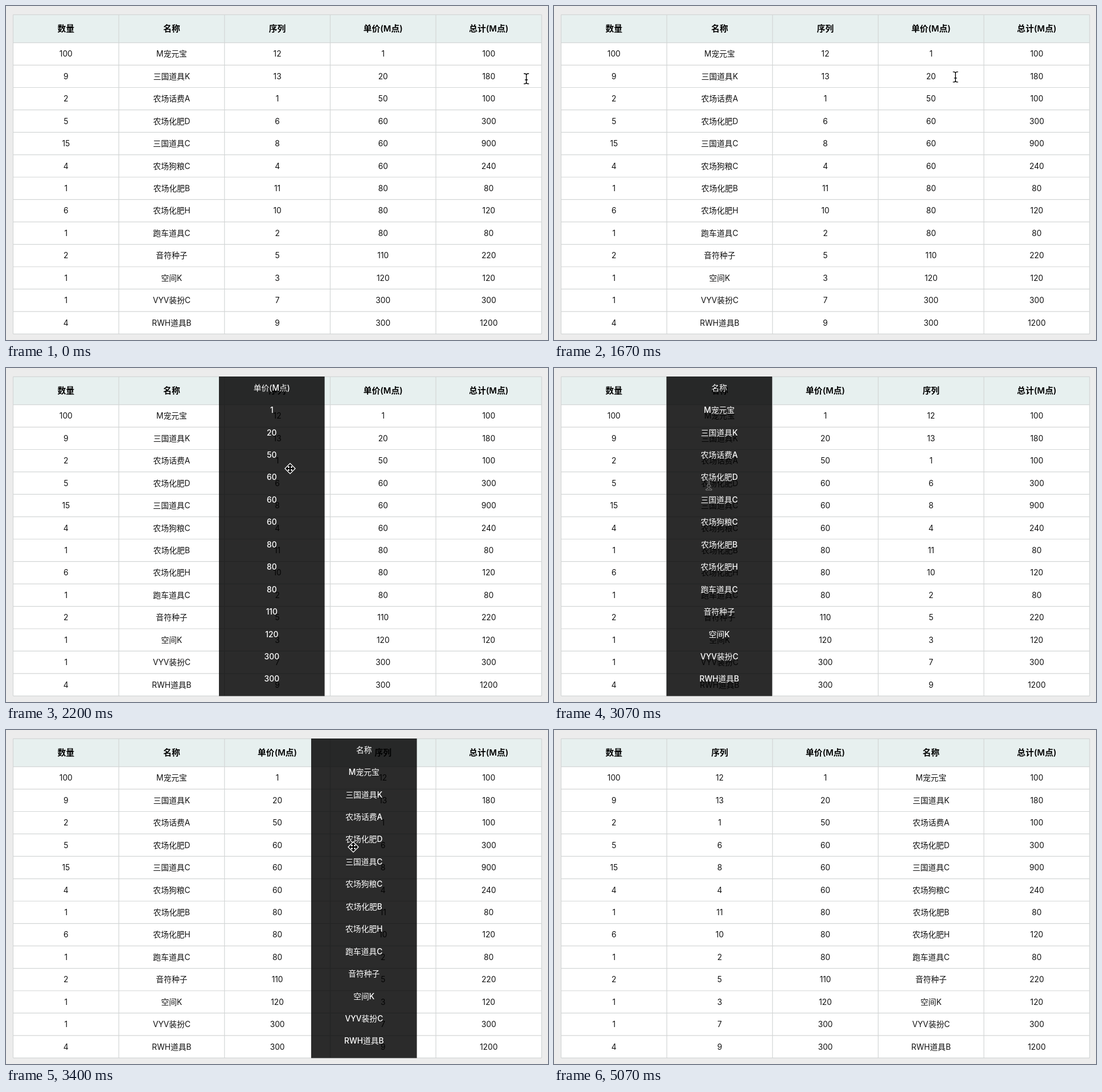
An HTML page for the animation above (5140 ms loop, 952 by 588 pixels).

```html
<!DOCTYPE html>
<html lang="zh-CN">
<head>
<meta charset="utf-8">
<title>拖动表格列</title>
<style>
  html, body { margin: 0; width: 100%; height: 100%; overflow: hidden; background: #ececec; }
  svg { display: block; width: 952px; height: 588px; }
  text { font: 13.8px Inter, "Noto Sans CJK SC", sans-serif; text-anchor: middle; fill: #111; }
  .head { font-size: 14.8px; font-weight: 600; fill: #000; }
  .ghost text { font-weight: 500; fill: #fff; }
  .line { fill: none; stroke: #d3d6d6; stroke-width: 1.2; }
  .cursor path { fill: none; stroke-linecap: round; stroke-linejoin: round; }
</style>
</head>
<body>
<svg id="stage" viewBox="0 0 952 588"></svg>
<script>
const LOOP = 5140, STEP = 200 / 3;
const LEFT = 12.5, COL = 185.65, TOP = 15.3, BODY = 64.6, ROW = 39.44;
const RIGHT = LEFT + 5 * COL, BOTTOM = BODY + 13 * ROW;

const columns = [
  '数量 100 9 2 5 15 4 1 6 1 2 1 1 4',
  '名称 M宠元宝 三国道具K 农场话费A 农场化肥D 三国道具C 农场狗粮C 农场化肥B 农场化肥H 跑车道具C 音符种子 空间K VYV装扮C RWH道具B',
  '序列 12 13 1 6 8 4 11 10 2 5 3 7 9',
  '单价(M点) 1 20 50 60 60 60 80 80 80 110 120 300 300',
  '总计(M点) 100 180 100 300 900 240 80 120 80 220 120 300 1200'
].map(s => s.split(' '));

// Column order from each drop on
const orders = [[0, '01234'], [2330, '01324'], [3530, '02314']];

// Pointer path: time, x, y
const path = [
  [0, 914, 128], [200, 904, 119], [400, 856, 86], [530, 831, 70], [700, 831, 52],
  [930, 831, 45], [1130, 831, 45], [1300, 808, 62], [1600, 715, 106], [1800, 687, 160],
  [1870, 684, 166], [1930, 669, 167], [2070, 592, 171], [2200, 499, 177], [2330, 496, 178],
  [2500, 400, 188], [2670, 306, 198], [2800, 272, 205], [3070, 272, 205], [3130, 298, 205],
  [3200, 370, 206], [3270, 455, 206], [3400, 610, 206], [3470, 638, 206]
];

// Dragged column: start, end, column, left edge over time
const drags = [
  { from: 1870, to: 2330, col: 3, x: [[1870, 569], [1930, 553], [2070, 470], [2200, 374], [2270, 372]] },
  { from: 3000, to: 3530, col: 1, x: [[3070, 197.5], [3130, 223.5], [3200, 296], [3270, 381], [3400, 536], [3470, 564]] }
];

const stage = document.getElementById('stage');

function add(parent, tag, attrs = {}, text = '') {
  const el = document.createElementNS('http://www.w3.org/2000/svg', tag);
  for (const k in attrs) el.setAttribute(k, attrs[k]);
  el.textContent = text;
  return parent.appendChild(el);
}

const rect = (parent, x, y, width, height, fill) => add(parent, 'rect', { x, y, width, height, fill });
const label = (parent, text, y, size, cls = '') =>
  add(parent, 'text', { x: COL / 2, y: y + size * .363, class: cls }, text);
const place = (el, x, y = 0) => el.setAttribute('transform', `translate(${x} ${y})`);
const show = (el, on) => el.setAttribute('visibility', on ? 'visible' : 'hidden');

rect(stage, LEFT, TOP, RIGHT - LEFT, BOTTOM - TOP, '#fff');
rect(stage, LEFT, TOP, RIGHT - LEFT, BODY - TOP, '#e7f0ef');
let grid = `M${LEFT} ${TOP}H${RIGHT}`;
for (let r = 0; r <= 13; r++) grid += `M${LEFT} ${BODY + r * ROW}H${RIGHT}`;
for (let c = 0; c <= 5; c++) grid += `M${LEFT + c * COL} ${TOP}V${BOTTOM}`;
add(stage, 'path', { d: grid, class: 'line' });

const cols = columns.map(cells => {
  const g = add(stage, 'g');
  cells.forEach((s, r) => r
    ? label(g, s, BODY + (r - .5) * ROW, 13.8)
    : label(g, s, 40, 14.8, 'head'));
  return g;
});

for (const d of drags) {
  d.el = add(stage, 'g', { class: 'ghost' });
  rect(d.el, 0, 15, COL, BOTTOM + .2 - 15, 'rgba(0,0,0,.83)');
  columns[d.col].forEach((s, r) => label(d.el, s, 34.7 + r * ROW, 13.8));
}

function cursor(...shapes) {
  const g = add(stage, 'g', { class: 'cursor' });
  for (const [d, style] of shapes) add(g, 'path', { d, style });
  return g;
}

const beam = 'M-4-9Q0-9 0-6.5Q0-9 4-9M0-7V7M-4 9Q0 9 0 6.5Q0 9 4 9M-2 2H2';
const cursors = {
  text: cursor([beam, 'stroke:#fff;stroke-width:3.2'], [beam, 'stroke:#000;stroke-width:1.4']),
  hand: cursor(
    ['M-5.2-7.4Q-4-9.2-2.2-7.6L.2-2.2Q2-3.6 3-1.9Q5-3 5.9-1Q7.8-1.6 8.3.4Q9 4 7 6.5L6.6 9H-1.2Q-2.6 5.8-6.6 2.6Q-8 .6-6-.1Q-4.6-.2-2.8 1.4Z',
      'fill:#fff;stroke:#000;stroke-width:1.2'],
    ['M.8 2.5V6M3 2.3V6M5.2 2.3V6', 'stroke:#000;stroke-width:1']),
  move: cursor(
    ['M0-9L9 0L0 9L-9 0Z', 'fill:#000;stroke:#fff;stroke-width:1.4'],
    ['M-3.9-3.9h2.7v2.7h-2.7ZM1.2-3.9h2.7v2.7h-2.7ZM-3.9 1.2h2.7v2.7h-2.7ZM1.2 1.2h2.7v2.7h-2.7Z', 'fill:#fff'])
};

function at(keys, t, i) {
  const n = keys.findIndex(k => k[0] > t);
  if (n === 0) return keys[0][i];
  if (n < 0) return keys[keys.length - 1][i];
  const a = keys[n - 1], b = keys[n];
  return a[i] + (b[i] - a[i]) * (t - a[0]) / (b[0] - a[0]);
}

function draw(time) {
  const t = Math.round(Math.floor((time + 3.4) / STEP) * STEP / 10) * 10;
  const order = orders.filter(o => o[0] <= t).pop()[1];
  cols.forEach((g, c) => place(g, LEFT + order.indexOf(c) * COL));

  let drag = null;
  for (const d of drags) {
    const on = t >= d.from && t < d.to;
    if (on) drag = d;
    show(d.el, on);
    place(d.el, at(d.x, t, 1));
  }

  const x = at(path, t, 1), y = at(path, t, 2);
  const moving = drag && t > drag.x[0][0];
  const kind = moving ? 'move' : y < 64 ? 'hand' : 'text';
  for (const k in cursors) {
    show(cursors[k], k === kind && t < 3530);
    place(cursors[k], x, y);
  }
  cursors.text.setAttribute('opacity', drag ? .55 : 1);
}

const start = performance.now();
function tick() {
  draw((performance.now() - start) % LOOP);
  requestAnimationFrame(tick);
}
tick();
</script>
</body>
</html>
```
